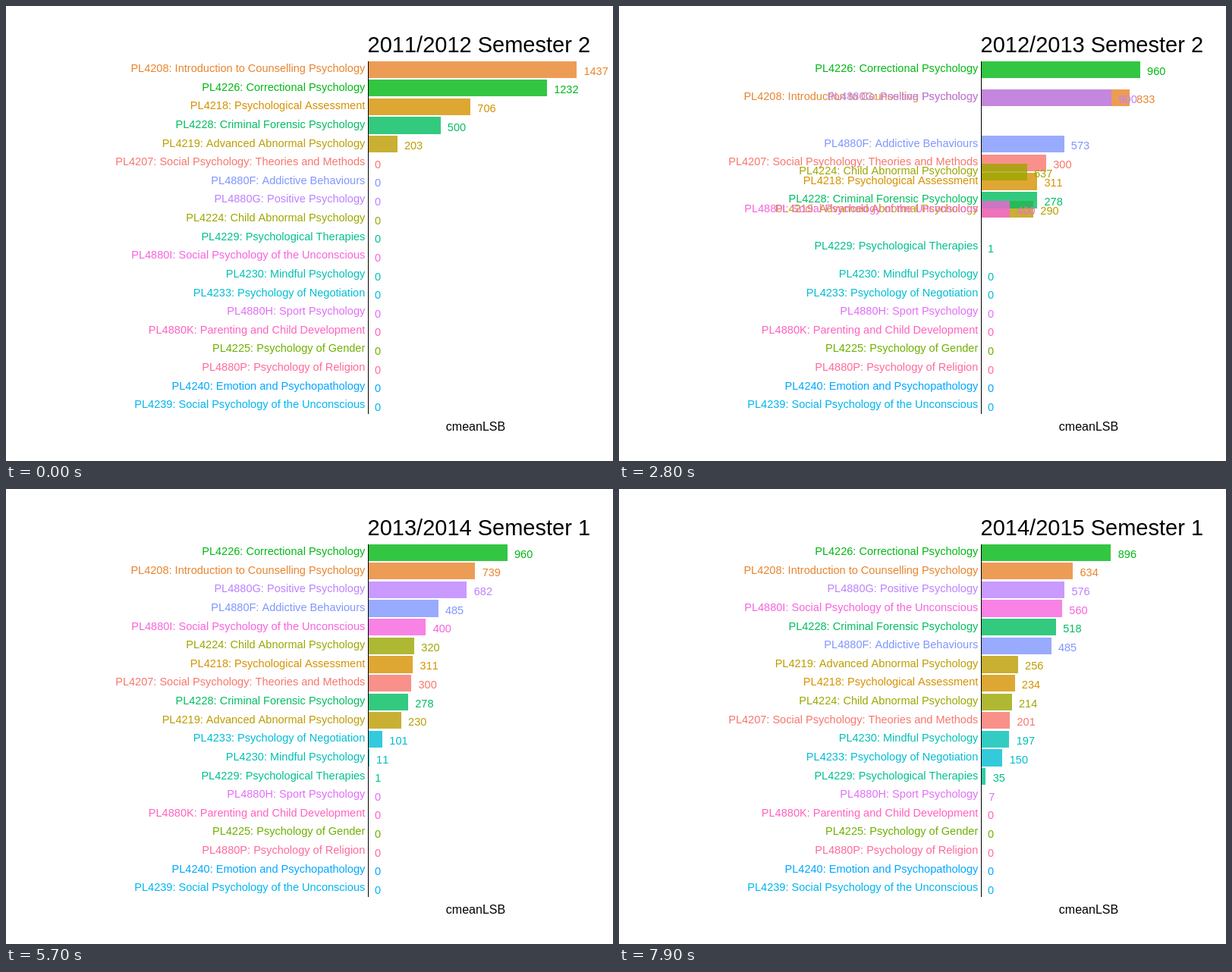
These frames come from a looping animation (800x600 px, 8000 ms). An HTML page with a canvas:

```html
<!DOCTYPE html>
<html lang="en">
<head>
<meta charset="utf-8">
<title>Module ranking by semester</title>
<style>
  html, body { margin: 0; width: 100%; height: 100%; overflow: hidden; background: #fff; }
  canvas { display: block; }
</style>
</head>
<body>
<canvas id="stage" width="800" height="600"></canvas>
<script>
const ctx = document.getElementById('stage').getContext('2d');

const semesters = ['2011/2012 Semester 2', '2012/2013 Semester 1', '2012/2013 Semester 2',
  '2013/2014 Semester 1', '2013/2014 Semester 2', '2014/2015 Semester 1'];

// Name and value per semester; ties keep this order.
const modules = [
  ['PL4208: Introduction to Counselling Psychology', 1437, 1213, 833, 739, 602, 634],
  ['PL4226: Correctional Psychology', 1232, 1232, 960, 960, 896, 896],
  ['PL4218: Psychological Assessment', 706, 466, 311, 311, 234, 234],
  ['PL4228: Criminal Forensic Psychology', 500, 500, 278, 278, 518, 518],
  ['PL4219: Advanced Abnormal Psychology', 203, 434, 290, 230, 306, 256],
  ['PL4207: Social Psychology: Theories and Methods', 0, 600, 300, 300, 201, 201],
  ['PL4880F: Addictive Behaviours', 0, 573, 573, 485, 485, 485],
  ['PL4880G: Positive Psychology', 0, 900, 900, 682, 682, 576],
  ['PL4224: Child Abnormal Psychology', 0, 0, 637, 320, 214, 214],
  ['PL4229: Psychological Therapies', 0, 0, 1, 1, 1, 35],
  ['PL4880I: Social Psychology of the Unconscious', 0, 0, 400, 400, 560, 560],
  ['PL4230: Mindful Psychology', 0, 0, 0, 11, 11, 197],
  ['PL4233: Psychology of Negotiation', 0, 0, 0, 101, 101, 150],
  ['PL4880H: Sport Psychology', 0, 0, 0, 0, 0, 7],
  ['PL4880K: Parenting and Child Development'],
  ['PL4225: Psychology of Gender'],
  ['PL4880P: Psychology of Religion'],
  ['PL4240: Emotion and Psychopathology'],
  ['PL4239: Social Psychology of the Unconscious'],
].map(([name, ...values]) => ({
  name, values: semesters.map((_, i) => values[i] || 0), ranks: []
}));

semesters.forEach((_, s) =>
  [...modules].sort((a, b) => b.values[s] - a.values[s])
    .forEach((m, rank) => { m.ranks[s] = rank; }));

// Polar LUV colour (chroma 100, lightness 65) as a CSS colour.
function hueColor(degrees) {
  const L = 65, C = 100, h = degrees * Math.PI / 180;
  const Y = ((L + 16) / 116) ** 3;
  const u = C * Math.cos(h) / (13 * L) + 0.19784;
  const v = C * Math.sin(h) / (13 * L) + 0.46834;
  const X = 9 * Y * u / (4 * v), Z = 3 * Y / v - 5 * Y - X / 3;
  const gamma = c => {
    const g = c > 0.00304 ? 1.055 * c ** (1 / 2.4) - 0.055 : 12.92 * c;
    return Math.round(255 * Math.min(1, Math.max(0, g)));
  };
  return `rgb(${[
    3.240479 * X - 1.53715 * Y - 0.498535 * Z,
    -0.969256 * X + 1.875992 * Y + 0.041556 * Z,
    0.055648 * X - 0.204043 * Y + 1.057311 * Z
  ].map(gamma)})`;
}

modules.sort((a, b) => (a.name < b.name ? -1 : 1));
modules.forEach((m, i) => { m.color = hueColor(15 + 360 * i / modules.length); });

const LEFT = 477.16, SCALE = 0.1917, TOP = 84.15, ROW = 24.63, BAR = 0.9 * ROW;
const STEP = 100, FRAMES = 80, HOLD = 10, MOVE = 6;

const mix = (a, b, t) => a + (b - a) * t;
const cubicInOut = t => t < 0.5 ? 4 * t ** 3 : 1 - 4 * (1 - t) ** 3;

function text(str, x, y, size, color = '#000', align = 'left') {
  ctx.font = `${size}px "Liberation Sans", Arial, sans-serif`;
  ctx.fontKerning = 'none';
  ctx.textAlign = align;
  ctx.fillStyle = color;
  ctx.fillText(str, x, Math.round(y));
}

function draw(frame) {
  const phase = frame + 1;
  const from = Math.floor(phase / (HOLD + MOVE));
  const to = Math.min(from + 1, semesters.length - 1);
  const t = cubicInOut(Math.max(0, phase % (HOLD + MOVE) - HOLD) / MOVE);
  const nearest = t < 0.5 ? from : to;

  ctx.fillStyle = '#fff';
  ctx.fillRect(0, 0, 800, 600);

  const rows = modules.map(m => ({
    ...m,
    y: TOP + ROW * mix(m.ranks[from], m.ranks[to], t),
    end: LEFT + SCALE * mix(m.values[from], m.values[to], t)
  }));

  ctx.globalAlpha = 0.8;
  for (const r of rows) {
    const top = Math.floor(r.y - BAR / 2), bottom = Math.floor(r.y + BAR / 2);
    ctx.fillStyle = r.color;
    ctx.fillRect(478, top, Math.max(0, Math.floor(r.end) - 478), bottom - top);
  }
  ctx.globalAlpha = 1;
  for (const r of rows) text(r.name, 473.3, r.y + 2.85, 14.55, r.color, 'right');
  for (const r of rows) text(r.values[nearest], r.end + 8.8, r.y + 6.48, 14.55, r.color);

  ctx.fillStyle = '#000';
  ctx.fillRect(477, 73, 1, 465);
  text(semesters[nearest], 476.6, 61, 29);
  text('cmeanLSB', 619, 560, 16, '#000', 'center');
}

const start = performance.now();
function tick() {
  draw(Math.floor((performance.now() - start) / STEP) % FRAMES);
  requestAnimationFrame(tick);
}
tick();
</script>
</body>
</html>
```
